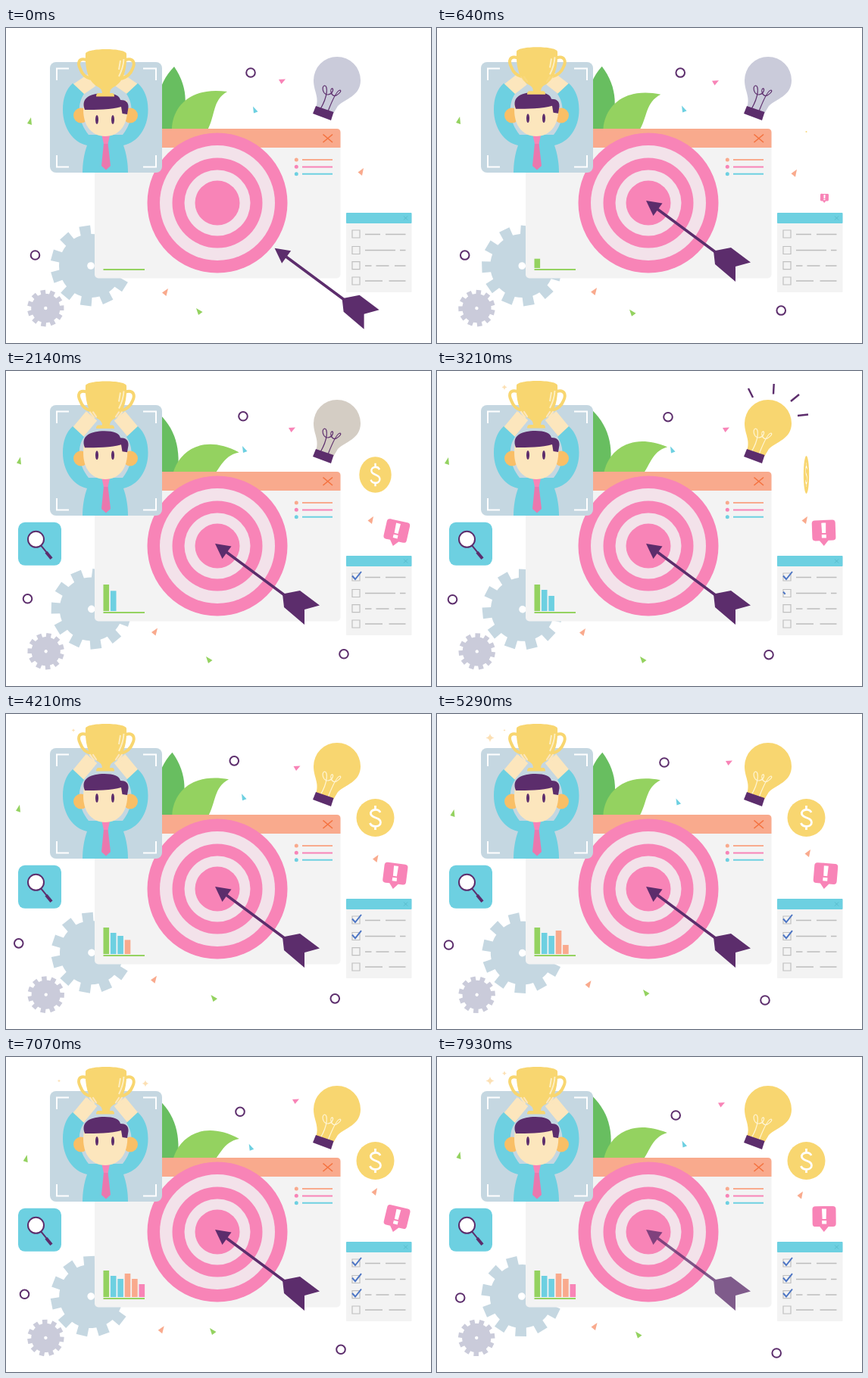
An HTML page for the animation above (8 s loop, 561 px wide and 416 px high).

```html
<!DOCTYPE html>
<html lang="en">
<head>
<meta charset="utf-8">
<title>Goal achieved</title>
<style>
  html, body { margin: 0; width: 100%; height: 100%; overflow: hidden; background: #fff; }
  svg { display: block; width: 561px; height: 416px; }
  .line { fill: none; stroke-width: 2; }
  .purple { fill: #5c2d6c; } .pink { fill: #f884b7; } .cyan { fill: #6dd0e1; }
  .orange { fill: #f9aa8d; } .green { fill: #94d260; } .yellow { fill: #f8d670; }
  .pale { fill: #f3f3f3; } .blush { fill: #f3e2ea; } .steel { fill: #c5d7e1; }
  .lilac { fill: #cacbda; } .skin { fill: #fce6bd; } .white { fill: #fff; }
  .ink { stroke: #5c2d6c; }
</style>
</head>
<body>
<svg viewBox="0 0 561 416">
  <path id="leafDark" fill="#68be60" d="M222 51C242 80 240 110 226 142H204C195 110 198 75 222 51Z"/>
  <path id="leafLight" class="green" d="M219 146V133C220 104 243 77 292 84C272 96 277 114 266 135V146Z"/>
  <g id="gearBig" class="steel"></g>
  <g id="gearSmall" class="lilac"></g>

  <g id="window">
    <rect class="pale" x="117" y="133" width="324.500" height="197.500" rx="5"/>
    <path class="orange" d="M117 158V138q0-5 5-5H436.500q5 0 5 5V158Z"/>
    <path class="line" stroke="#f4723f" style="stroke-width:1.6" d="M418.500 140.500L431 151M431 140.500L418.500 151"/>
    <circle class="orange" cx="383.300" cy="174" r="2.500"/>
    <circle class="pink" cx="383.300" cy="183.300" r="2.500"/>
    <circle class="cyan" cx="383.300" cy="192.700" r="2.500"/>
    <path class="line" stroke="#f9aa8d" d="M391 174h40"/>
    <path class="line" stroke="#f884b7" d="M391 183.400h40"/>
    <path class="line" stroke="#6dd0e1" d="M391 192.700h40"/>
    <g id="bars"></g>
    <path class="line" stroke="#94d260" d="M128.500 319h54.500"/>
    <g id="rings"></g>
  </g>

  <g id="person">
    <rect class="steel" x="58" y="45" width="148" height="146" rx="8"/>
    <path class="line" stroke="#fff" d="M67 69V53.500H83M181 53.500H198V69M198 168V183.500H181M83 183.500H67V168"/>
    <path class="line" id="forearms" stroke="#fce6bd" style="stroke-width:19"/>
    <path class="cyan" d="M88 73C79 81 75 93 75 108C75 131 88 151 107 155C103 166 101 179 101 191H161C161 179 159 166 155 155C174 151 187.500 132 187.500 108C187.500 93 183 81 174 73L159 87C169 101 168 124 154 141H109C95 124 93 101 103 87Z"/>
    <path fill="#ea78ae" d="M129 152H134.500L138 182L132 187.500L126 182Z"/>
    <path class="pink" d="M126.500 142H137L134.500 153H129Z"/>
    <circle cx="99" cy="115.500" r="10" fill="#f9bf66"/>
    <circle cx="164" cy="115.500" r="10" fill="#f9bf66"/>
    <path class="skin" d="M103 96C98 128 113 143 131 143C149 143 164 128 159.500 96Z"/>
    <g id="eyes" class="purple">
      <ellipse cx="120" cy="111" rx="2" ry="6"/>
      <ellipse cx="141" cy="111" rx="2" ry="6"/>
    </g>
    <path id="hair" class="purple" d="M104 101C98 85 112 79 130 79C142 79 150 82 151 88C158 88 162 91 161.500 98L160 107L153.500 106L152 97C140 101 118 101 104 101Z"/>
    <g id="trophy">
      <path class="yellow" d="M105 19C106 11 158 11 159 19C160 42 154 56 144 62Q137 65 137 71H140Q143 71 143 75.500H119Q119 71 122 71H127Q127 65 120 62C110 56 104 42 105 19Z"/>
      <path class="line" stroke="#f8d670" style="stroke-width:4" d="M106 27C96 24 94 31 98 39C101 47 105 50 112 52M158 27C168 24 171 31 167 39C164 47 159 50 152 52"/>
      <path class="line" stroke="#fdeec0" d="M155.500 26C155 36 152 43 149 49M151 28L149 40"/>
    </g>
    <path id="fingers" class="line" stroke="#fce6bd" style="stroke-width:2.200" stroke-linecap="round" d="M107 55l6 7M111 54l5 7M115 54l4 6M157 55l-6 7M153 54l-5 7M149 54l-4 6"/>
  </g>
  <g id="sparkles" fill="#fce0b4"></g>

  <g id="bulb">
    <path id="glass" d="M409 106C414 90 406 84 406 69A31 31 0 1 1 468 69C468 90 448 93 438 103L432 113Z"/>
    <path id="filament" class="line" style="stroke-width:1.200" d="M415 107C425 90 425 76 420.500 76C416 77 418 88 425 88C432 87 433 79 430 80C427 82 430 92 436 89C441 86 443 83 441 82C437 82 432 92 425 110"/>
    <path class="purple" d="M409 103L432.500 111L429 122L405 113Z"/>
    <path id="rays" class="line ink" style="stroke-width:2.400" pathLength="4" d="M417 35L411 23M444 30.500L444.700 17M467 40L478 31M476 59L490 57.500"/>
  </g>

  <g id="coin">
    <circle class="yellow" r="25"/>
    <path class="line" stroke="#fff" style="stroke-width:2.800" d="M6.500 -7C4 -13 -7 -11 -6 -5C-5 1 7 -1 7 6C7 13 -5 13 -7 7M0 -16V-10M0 10V16"/>
  </g>

  <g id="search">
    <rect class="cyan" x="-28.500" y="-28.500" width="57" height="57" rx="9"/>
    <path class="line ink" d="M2 2.500L9 11"/>
    <path class="line ink" style="stroke-width:4" d="M8.500 11L15.500 19.500"/>
    <circle class="white ink" cx="-5" cy="-6" r="10.500" stroke-width="2"/>
  </g>

  <g id="alert">
    <path class="pink" d="M-11.500 -34H11.500q4 0 4 4V-11q0 4 -4 4H5.500L-.500 0L-6 -7H-11.500q-4 0 -4 -4V-30q0 -4 4 -4Z"/>
    <path class="white" d="M-3 -30.500H3L2.500 -17H-2.500ZM-3 -15H3V-10.500H-3Z"/>
  </g>

  <g id="list">
    <rect class="pale" x="449" y="244" width="86.500" height="105" rx="1"/>
    <rect class="cyan" x="449" y="244" width="86.500" height="14" rx="1"/>
    <path class="line" stroke="#58bccd" style="stroke-width:1" d="M525 248.500l5 5M530 248.500l-5 5"/>
    <path class="line" stroke="#bdbdbd" style="stroke-width:1.700" d="M474 272.500h20M501 272.500h26.500M474 293.500h40M520 293.500h7.500M474 314h8.500M488.500 314h17M513 314h14.500M474 334h23M505.500 334h22"/>
    <path class="line" stroke="#c0c0c0" style="stroke-width:1.200" d="M457 267h10v10h-10zM457 288.500h10v10h-10zM457 308.700h10v10h-10zM457 329h10v10h-10z"/>
    <g id="checks" class="line" stroke="#4c75c4"></g>
  </g>

  <g id="dots" class="line ink">
    <circle cx="323" cy="59" r="5.800"/>
    <circle cx="38.500" cy="300" r="5.800"/>
    <circle cx="456" cy="373" r="5.800"/>
  </g>
  <g id="chipsA">
    <path class="green" d="M33 118L34 128L28 126Z"/>
    <path class="cyan" d="M326 103.500L332.500 110.500L327 112.500Z"/>
    <path class="orange" d="M214 344L206 349.500L211.500 354Z"/>
  </g>
  <g id="chipsB">
    <path class="pink" d="M360 68L369 67.500L363.500 74Z"/>
    <path class="orange" d="M472 185L464.500 190.500L470 195Z"/>
    <path class="green" d="M251 370L259.500 375L254 379Z"/>
  </g>

  <g id="arrow" class="purple">
    <path d="M276 228L297.500 231.500L285.500 248Z"/>
    <path class="line ink" style="stroke-width:3.600" d="M288 237L369 297"/>
    <path d="M365 294.500L388 290L414 309.500L394 315V335L367 312Z"/>
  </g>
</svg>

<script>
const LOOP = 8000;
const $ = id => document.getElementById(id);
const clamp = x => Math.max(0, Math.min(1, x));
const ramp = (t, start, length) => clamp((t - start) / length);
const smooth = p => p * p * (3 - 2 * p);
const easeOut = p => 1 - (1 - p) * (1 - p);
const wave = (t, peak, period) => Math.cos((t - peak) / period * 2 * Math.PI);
const move = (id, transform) => $(id).setAttribute("transform", transform);

function add(parent, tag, attributes) {
  const node = document.createElementNS("http://www.w3.org/2000/svg", tag);
  for (const key in attributes) node.setAttribute(key, attributes[key]);
  return $(parent).appendChild(node);
}

function gearPath(teeth, outer, root) {
  const points = [];
  for (let i = 0; i < teeth; i++) {
    for (const [radius, degrees] of [[root, -9.500], [outer, -8], [outer, 8], [root, 9.500], [root, 16.400]]) {
      const angle = (i * 360 / teeth + degrees - 99) * Math.PI / 180;
      points.push((radius * Math.cos(angle)).toFixed(2) + " " + (radius * Math.sin(angle)).toFixed(2));
    }
  }
  return "M" + points.join("L") + "Z";
}

for (const gear of ["gearBig", "gearSmall"]) {
  add(gear, "path", { d: gearPath(11, 53.500, 42) });
  add(gear, "circle", { r: 4.800, class: "white" });
}

[92.500, 76, 59.500, 43.500, 29.500].forEach((r, i) =>
  add("rings", "circle", { cx: 279, cy: 231, r, class: i % 2 ? "blush" : "pink" }));

const BAR_BASE = 317;
const bars = [["green", 35], ["cyan", 28], ["cyan", 24], ["orange", 31], ["orange", 24], ["pink", 17]]
  .map(([color, height], i) => ({
    height,
    start: 430 + 1140 * i,
    node: add("bars", "rect", { x: 128.500 + 9.400 * i, width: 7.600, class: color })
  }));

const checks = [[270.500, 1080], [291.700, 3140], [312, 5300]].map(([y, start]) => ({
  start,
  node: add("checks", "path", { d: `M457 ${y}l4 4.500l8 -10`, pathLength: 1 })
}));

const SPARKLE = "M0 -1Q.150 -.150 1 0Q.150 .150 0 1Q-.150 .150 -1 0Q-.150 -.150 0 -1Z";
const sparkles = [[89, 21.500, 4.500, 3600], [70, 31.500, 5.800, 5400], [184, 35, 4.800, 6900]]
  .map(([x, y, size, peak]) => ({ x, y, size, peak, node: add("sparkles", "path", { d: SPARKLE }) }));

// Drift offsets, passed through smoothly at the shared times.
const driftTimes = [0, 1210, 2140, 3210, 5290, 7070, 7930];
const drifts = {
  dots: [[0, -3.800, -10, -18, -23, -14, -7.800], [0, .200, .800, 1.700, 5, 13.300, 18]],
  chipsA: [[0, -6, -14, -18, -10.500, -5.300, -2.500], [0, -2, -4.500, -4, 8, 11.300, 7]],
  chipsB: [[0, 6, 13, 17, 21, 18, 11], [0, 3.500, 7, 7, -6, -12, -7.500]]
};

function spline(values, t) {
  const T = driftTimes, last = T.length - 1;
  let i = 0;
  while (i < last - 1 && t > T[i + 1]) i++;
  const slope = k => {
    const a = Math.max(0, k - 1), b = Math.min(last, k + 1);
    return (values[b] - values[a]) / (T[b] - T[a]);
  };
  const h = T[i + 1] - T[i], p = (t - T[i]) / h, q = 1 - p;
  return q * q * (1 + 2 * p) * values[i] + p * p * (3 - 2 * p) * values[i + 1]
    + h * p * q * (q * slope(i) - p * slope(i + 1));
}

function mix(from, to, p) {
  return `rgb(${from.map((v, i) => Math.round(v + (to[i] - v) * p))})`;
}

function drawPerson(t) {
  const low = 1 - smooth(ramp(t, 0, 2400));
  move("trophy", `translate(0 ${15 * low})`);
  move("hair", `translate(0 ${7 * low})`);
  move("eyes", `translate(0 ${10 * low})`);
  move("fingers", `translate(0 ${13 * low})`);
  $("fingers").style.opacity = 1 - low;
  const y = 59 + 10 * low;
  $("forearms").setAttribute("d", `M94 82L113 ${y}M169 82L150 ${y}`);
}

function drawBulb(t) {
  const lit = smooth(ramp(t, 1950, 650));
  $("glass").style.fill = mix([202, 203, 218], [248, 214, 112], lit);
  $("filament").style.stroke = mix([92, 45, 108], [255, 246, 215], smooth(ramp(t, 2150, 450)));
  const shown = ramp(t, 2600, 300) * (1 - ramp(t, 3400, 300));
  $("rays").style.strokeDasharray = `${shown} ${1 - shown}`;
  $("rays").style.visibility = shown ? "visible" : "hidden";
}

function draw(t) {
  const sway = (1 - wave(t, 0, 4700)) / 2;
  move("leafDark", `rotate(${-16 * sway} 215 140)`);
  move("leafLight", `rotate(${20 * sway} 232 141)`);

  const turn = t * .024;
  move("gearBig", `translate(112 315) rotate(${turn}) translate(0 -1)`);
  move("gearSmall", `translate(52.300 370.500) rotate(${turn}) scale(.455) translate(0 -1)`);

  for (const { node, start, height } of bars) {
    const h = height * ramp(t, start, 600);
    node.setAttribute("y", BAR_BASE - h);
    node.setAttribute("height", h);
  }
  for (const { node, start } of checks) {
    const p = ramp(t, start, 330);
    node.style.strokeDasharray = `${p} 2`;
    node.style.visibility = p ? "visible" : "hidden";
  }
  for (const { node, x, y, size, peak } of sparkles) {
    const scale = t < peak - 1200 ? 0 : size * (1 + wave(t, peak, 2400)) / 2;
    node.setAttribute("transform", `translate(${x} ${y}) scale(${scale})`);
  }

  drawPerson(t);
  drawBulb(t);

  const coin = easeOut(ramp(t, 600, 1985));
  const spin = Math.cos(2 * Math.PI * smooth(ramp(t, 1800, 2040)));
  move("coin", `translate(487.500 137) scale(${coin * spin} ${coin})`);
  move("search", `translate(44.500 228.300) scale(${smooth(ramp(t, 734, 1100))})`);
  const rock = 4.500 + 9 * wave(t, 2300, 2400);
  move("alert", `translate(511.300 231) rotate(${rock}) scale(${smooth(ramp(t, 400, 600))})`);

  for (const id in drifts) {
    const [x, y] = drifts[id].map(values => spline(values, t));
    move(id, `translate(${x} ${y})`);
  }

  const away = 1 - easeOut(ramp(t, 0, 400));
  move("arrow", `translate(${79 * away} ${63 * away})`);
  $("arrow").style.opacity = 1 - ramp(t, 7790, 600);
}

const begin = performance.now();
function tick() {
  draw((performance.now() - begin) % LOOP);
  requestAnimationFrame(tick);
}
tick();
</script>
</body>
</html>
```
